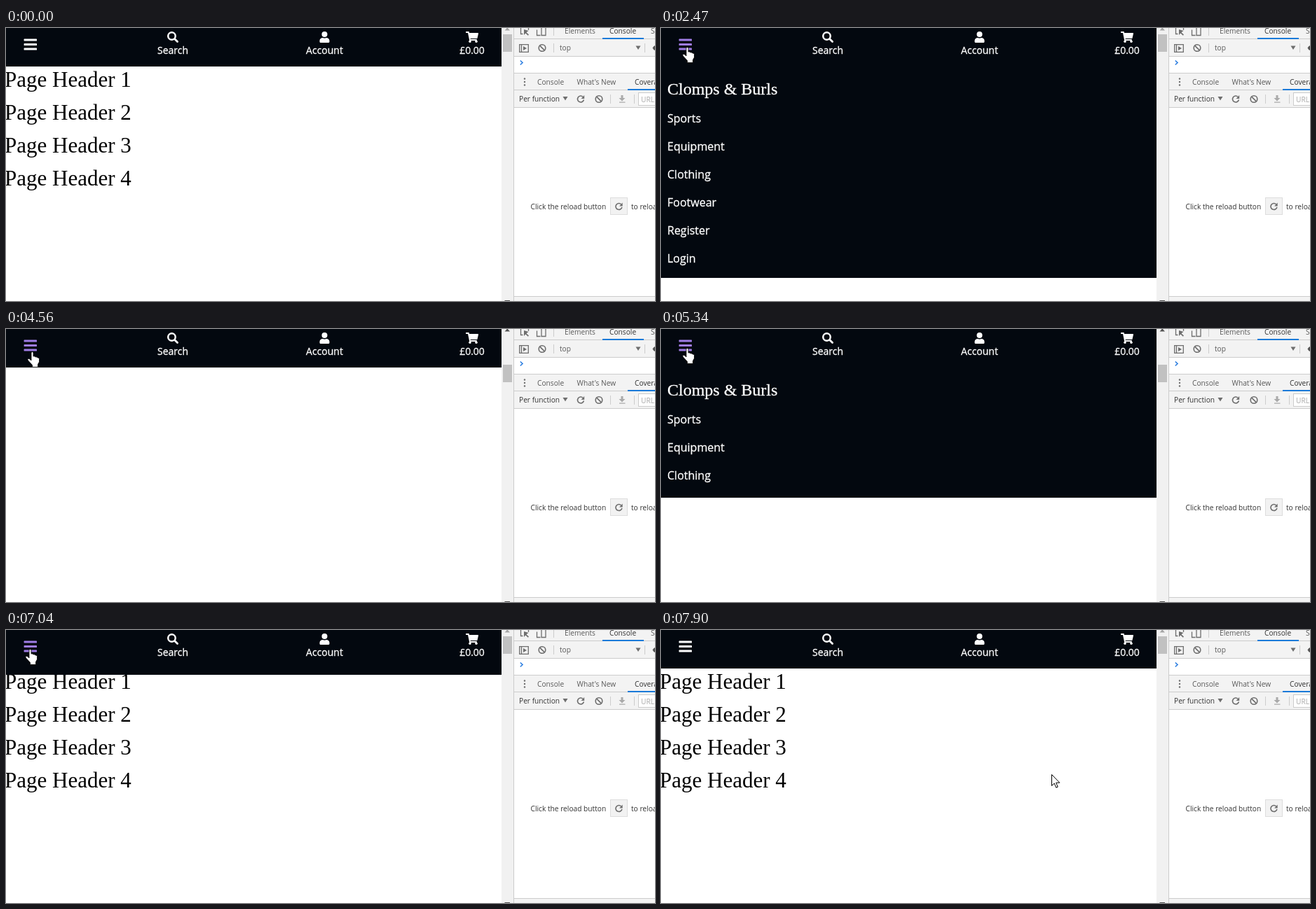
These frames come from a looping animation (926x390 px, 7.99 s). An HTML page:

```html
<!DOCTYPE html>
<html lang="en">
<head>
<meta charset="utf-8">
<title>Slide-down menu</title>
<style>
  html, body { margin: 0; width: 100%; height: 100%; overflow: hidden; background: #fff; }
  svg { display: block; }
  .serif { font-family: "Liberation Serif", serif; }
  .nav, .menu { fill: #fff; stroke: #fff; stroke-width: .3; }
  .nav { font: 14px "Open Sans", sans-serif; text-anchor: middle; }
  .menu { font: 16px "Open Sans", sans-serif; }
  .tools { font: 10.2px "Open Sans", sans-serif; fill: #333; }
  .dim { fill: #5a5a5a; }
  .line { fill: none; stroke: #ccc; }
  .icon { fill: none; stroke: #6e6e6e; stroke-width: 1.6; }
</style>
</head>
<body>
<svg width="926" height="390" viewBox="0 0 926 390">
  <defs>
    <clipPath id="pageClip"><rect width="707" height="390"/></clipPath>
    <clipPath id="menuClip"><rect id="menuArea" width="707" height="55"/></clipPath>
    <g id="reload" class="icon">
      <path d="M3.2-3.2A4.5 4.5 0 1 0 4.4 1"/>
      <path d="M5.2-5.4V-.6H.6Z" fill="#6e6e6e" stroke="none"/>
    </g>
    <g id="block" class="icon"><circle r="4.8"/><path d="M-3.4-3.4 3.4 3.4"/></g>
    <path id="caret" d="M0 0h7L3.5 5.5Z" fill="#6e6e6e"/>
  </defs>

  <g clip-path="url(#pageClip)">
    <g id="headings" class="serif" font-size="31"></g>
    <rect id="header" width="707" height="55" fill="#03080f"/>
    <g id="menu" class="menu" clip-path="url(#menuClip)">
      <text class="serif" x="9" y="95" style="font-size:24px">Clomps &amp; Burls</text>
    </g>
    <g id="burger">
      <rect x="25.6" y="15.6" width="18.4" height="3" rx=".6"/>
      <rect x="25.6" y="22.1" width="18.4" height="3" rx=".6"/>
      <rect x="25.6" y="28.6" width="18.4" height="3" rx=".6"/>
    </g>
    <g fill="none" stroke="#fff" stroke-linecap="round">
      <circle cx="236.5" cy="11.5" r="5.25" stroke-width="2.5"/>
      <path d="M240.8 15.8 244.6 19.6" stroke-width="2.8"/>
    </g>
    <g fill="#fff">
      <circle cx="454.5" cy="9" r="4"/>
      <path d="M451.7 14h.5q2.3 1 4.6 0h.5a4.2 4.2 0 0 1 4.2 4.2v1.3q0 1.5-1.5 1.5h-11q-1.5 0-1.5-1.5v-1.3a4.2 4.2 0 0 1 4.2-4.2Z"/>
      <path d="M656.7 5h3.4q.7 0 .8.8L661 7h12.3q.9 0 .7.9l-1.5 6.5q-.1.6-.7.6h-9.2l.2 1h8.4q.8 0 .7.9l-.3 1.1h-10.3L659 7h-2.3q-.7 0-.7-.7v-.6q0-.7.7-.7Z"/>
      <circle cx="662" cy="19.2" r="1.75"/>
      <circle cx="671" cy="19.2" r="1.75"/>
    </g>
    <g class="nav">
      <text x="238" y="37">Search</text>
      <text x="454.5" y="37">Account</text>
      <text x="665" y="37">£0.00</text>
    </g>
  </g>

  <rect x="707" width="17" height="390" fill="#f1f1f1"/>
  <path id="upArrow" d="M711.5 3.5h7.5L715.3-.5Z"/>
  <path d="M711.5 389h7.5v1h-7.5Z" fill="#505050"/>
  <rect id="thumb" x="709" y="9" width="13" height="25" fill="#c1c1c1"/>

  <g class="tools">
    <path d="M724 0h202v40H724ZM724 65h202v48H724ZM724 384h202v6H724Z" fill="#f3f3f3"/>
    <path class="line" d="M724.5 0v390M725 15.5h201M725 40.5h201M725 64.5h201M725 88.5h201M725 113.5h201M725 383.5h201M781.5 0v11M781.5 22v13M911.5 22v13M862.5 95v13M896.5 95v13"/>
    <path d="M851 14h59v2h-59ZM887 87h39v2h-39Z" fill="#1a7ad9"/>

    <g class="icon">
      <path d="M734.5 0v8.5h3M745.5 0v3M757.5 2.5v8h5M761-1h9v11.5h-6V0" stroke-width="1.3"/>
      <path d="M739 2v8l2.3-2.6 3.5 3.4 1.2-1.2-3.5-3.4L745.5 4Z" fill="#6e6e6e" stroke="none"/>
      <path d="M732.7 23.7h12.6v10.6h-12.6ZM735.5 23.5v11" stroke-width="1.3"/>
      <path d="M738 26v6l5-3Z" fill="#6e6e6e" stroke="none"/>
      <path d="M926 25q-2.5 1-3.5 3.5 1 2.5 3.5 3.5Z" fill="#555" stroke="none"/>
      <path d="m733.8 46.5 3.2 3-3.2 3" style="stroke:#2b7de0"/>
    </g>
    <use href="#block" x="765" y="28.5"/>
    <use href="#caret" x="898.5" y="25.5"/>
    <g fill="#6e6e6e">
      <circle cx="740" cy="72.5" r="1.2"/><circle cx="740" cy="77" r="1.2"/><circle cx="740" cy="81.5" r="1.2"/>
    </g>
    <use href="#caret" x="794.5" y="98"/>
    <use href="#reload" x="820" y="101.5"/>
    <use href="#block" x="846" y="101.5"/>
    <path d="M877.5 96h3v4h3l-4.5 4.5-4.5-4.5h3ZM875 105.5h8.5v1.2H875Z" fill="#aaa"/>
    <rect x="902.5" y="92.5" width="60" height="18" fill="#fff" stroke="#ccc"/>
    <rect x="862.5" y="242.5" width="24" height="24" fill="#f2f2f2" stroke="#ddd"/>
    <use href="#reload" x="874.5" y="255"/>

    <text class="dim" x="797" y="8">Elements</text>
    <text x="861" y="8">Console</text>
    <text class="dim" x="920" y="8">Sources</text>
    <text class="dim" x="790" y="32">top</text>
    <text class="dim" x="758" y="81">Console</text>
    <text class="dim" x="814.5" y="81">What's New</text>
    <text x="897" y="81">Coverage</text>
    <text x="732" y="105">Per function</text>
    <text x="906" y="106" style="fill:#aaa">URL filter</text>
    <text x="748.5" y="259">Click the reload button</text>
    <text x="892" y="259">to reload</text>
  </g>

  <path id="arrow" d="M.5.5V16.5L4.2 13 6.8 19.2 9.2 18.2 6.7 12.2H11.8Z" fill="#fff" stroke="#000"/>
  <path id="hand" d="M6 2a1.5 1.5 0 0 1 3 0V7q3-.6 3 1 2.8-.6 3 1 2.5-.3 2.5 1.6V15L15.5 18.5V22.5H7.5V19.5L1.5 13Q.2 11 1.6 10.4T5 12L6 13Z" fill="#fff" stroke="#000" stroke-width=".8"/>
</svg>
<script>
const LOOP = 7990, SLIDE = 350;
const $ = id => document.getElementById(id);

// Screen refreshes: [first, last, count]; the picture holds in between.
const bursts = [[450, 910, 7], [1060, 1840, 11], [1920, 1920, 1], [2070, 2470, 6],
  [3020, 3790, 11], [4020, 4560, 8], [4730, 5040, 5], [5340, 6130, 11],
  [6210, 6980, 11], [7040, 7810, 11], [7900, 7900, 1]];

// Keys: [time, ...values]
const pointerKeys = [[450, 803, 372], [910, 718, 258], [990, 718, 258], [1610, 60, 48],
  [1840, 38, 33], [1920, 38, 28], [3330, 38, 28], [3560, 237, 254], [4180, 237, 254],
  [4490, 38, 33], [4640, 38, 33], [4730, 38, 28], [5610, 38, 28], [5850, 210, 211],
  [6560, 210, 211], [6980, 35, 28], [7560, 35, 28], [7810, 516, 212], [7900, 557, 206]];
const thumbKeys = [[3600, 9], [3790, 37], [4000, 37], [4200, 51], [5900, 51], [6480, 9]];
const openings = [2050, 4690, 7024], closings = [2935, 5256.4, 7400];

const clamp = x => Math.min(1, Math.max(0, x));

function addText(parent, text, x, y) {
  const node = document.createElementNS("http://www.w3.org/2000/svg", "text");
  node.setAttribute("x", x);
  node.setAttribute("y", y);
  node.textContent = text;
  parent.append(node);
}
for (let i = 0; i < 4; i++) addText($("headings"), `Page Header ${i + 1}`, -2, 84 + 47 * i);
["Sports", "Equipment", "Clothing", "Footwear", "Register", "Login"]
  .forEach((label, i) => addText($("menu"), label, 9, 134.5 + 40 * i));

function heldTime(t) {
  const burst = bursts.findLast(b => b[0] <= t);
  if (!burst) return 0;
  const [first, last, count] = burst;
  if (t >= last) return last;
  const step = (last - first) / (count - 1);
  return first + Math.floor((t - first) / step) * step;
}

function valuesAt(keys, t) {
  const next = keys.findIndex(k => k[0] > t);
  if (next < 0) return keys.at(-1).slice(1);
  if (next === 0) return keys[0].slice(1);
  const a = keys[next - 1], b = keys[next];
  const p = (t - a[0]) / (b[0] - a[0]), s = p * p * (3 - 2 * p);
  return a.slice(1).map((v, i) => v + (b[i + 1] - v) * s);
}

// The CSS "ease" curve, cubic-bezier(.25, .1, .25, 1)
function ease(x) {
  x = clamp(x);
  const bezier = (s, a, b) => 3 * s * (1 - s) ** 2 * a + 3 * s * s * (1 - s) * b + s ** 3;
  let low = 0, high = 1;
  for (let i = 0; i < 20; i++) {
    const mid = (low + high) / 2;
    if (bezier(mid, .25, .25) < x) low = mid; else high = mid;
  }
  return bezier(high, .1, 1);
}

function draw(now) {
  const t = heldTime(now % LOOP);

  const slid = starts => starts.reduce((sum, start) => sum + (t > start ? ease((t - start) / SLIDE) : 0), 0);
  const height = Math.round(55 + 302 * (slid(openings) - slid(closings)));
  $("header").setAttribute("height", height);
  $("menuArea").setAttribute("height", height);

  const [thumb] = valuesAt(thumbKeys, t);
  $("thumb").setAttribute("y", Math.round(thumb));
  $("headings").setAttribute("transform", `translate(0 ${Math.round((9 - thumb) * 15)})`);
  $("upArrow").setAttribute("fill", thumb > 9 ? "#505050" : "#a3a3a3");

  const [x, y] = valuesAt(pointerKeys, t).map(Math.round);
  const shown = t >= 450, hovering = shown && x < 54 && y < 45;
  $("burger").setAttribute("fill", hovering ? "#a07de6" : "#fff");
  $("arrow").setAttribute("visibility", shown && !hovering ? "visible" : "hidden");
  $("arrow").setAttribute("transform", `translate(${x} ${y})`);
  $("hand").setAttribute("visibility", hovering ? "visible" : "hidden");
  $("hand").setAttribute("transform", `translate(${x - 8} ${y - 1})`);

  requestAnimationFrame(() => draw(performance.now()));
}
draw(0);
</script>
</body>
</html>
```
